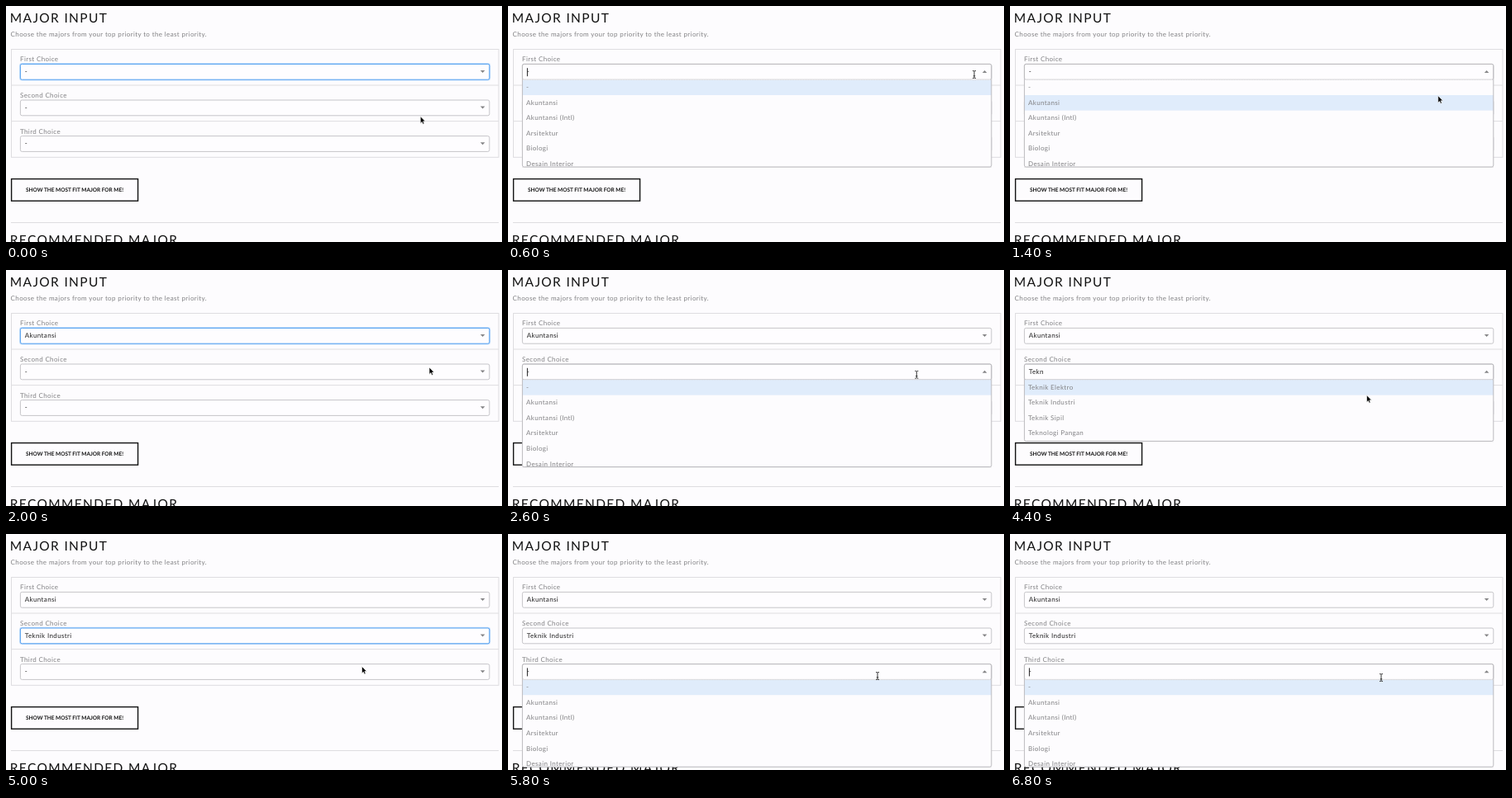
Animation, 600 px wide and 286 px high, one loop 7000 ms. Source, as an HTML page:

```html
<!DOCTYPE html>
<html lang="en">
<head>
<meta charset="utf-8">
<title>Major input</title>
<style>
  html, body { margin: 0; width: 100%; height: 100%; overflow: hidden; background: #fdfcfe; }
  svg { display: block; width: 600px; height: 286px; }
  text {
    font: 8px Lato, "Open Sans", sans-serif;
    letter-spacing: .37px;
    text-rendering: geometricPrecision;
    white-space: pre;
  }
  .title { font-size: 15.5px; letter-spacing: 1.35px; fill: #111; }
  .button { font-size: 6.5px; font-weight: 700; letter-spacing: 0; fill: #111; }
  .soft { fill: #828284; }
  .value { fill: #222; }
  .line { fill: none; stroke: #dedde0; }
</style>
</head>
<body>
<svg id="stage" viewBox="0 0 600 286"></svg>
<script>
const LOOP = 7000, OPTION_H = 18.6, MAX_H = 105.6;
const LABELS = ['First Choice', 'Second Choice', 'Third Choice'];
const MAJORS = ['-', 'Akuntansi', 'Akuntansi (Intl)', 'Arsitektur', 'Biologi', 'Desain Interior',
  'Teknik Elektro', 'Teknik Industri', 'Teknik Sipil', 'Teknologi Pangan'];
const START = { ring: -1, open: -1, picks: ['-', '-', '-'], typed: '', hover: 0, caret: 0, pointer: 'arrow' };
const opened = row => ({ ring: -1, open: row, typed: '', hover: 0, caret: 1, pointer: 'beam' });
const closed = (row, ...picks) => ({ ring: row, open: -1, picks, caret: 0, pointer: 'arrow' });

// Each entry changes part of the state and keeps the rest.
const STEPS = [
  [0, { ring: 0, at: [501.3, 133.8] }],
  [200, { at: [535, 108] }],
  [400, { at: [563, 82] }],
  [600, { ...opened(0), at: [564, 83] }],
  [1000, { caret: 0, at: [561, 84] }],
  [1200, { pointer: 'arrow', at: [540, 97] }],
  [1400, { hover: 1, at: [517.8, 108.8] }],
  [1600, { at: [516, 114] }],
  [1800, { ...closed(0, 'Akuntansi', '-', '-'), at: [515, 116] }],
  [2000, { at: [512, 118] }],
  [2200, { at: [505, 122] }],
  [2400, { at: [496, 126] }],
  [2600, { ...opened(1), at: [494.3, 126.8] }],
  [3000, { caret: 0 }],
  [3200, { typed: 'T', caret: 1, pointer: 'none' }],
  [3400, { typed: 'Te' }],
  [3600, { typed: 'Tek' }],
  [3800, { typed: 'Tekn' }],
  [4000, { pointer: 'beam' }],
  [4200, { caret: 0, pointer: 'arrow', at: [455, 140] }],
  [4400, { at: [431.5, 151.8] }],
  [4600, { hover: 1, at: [430, 157] }],
  [4800, { at: [430, 160] }],
  [5000, { ...closed(1, 'Akuntansi', 'Teknik Industri', '-'), at: [430.5, 160.5] }],
  [5400, { at: [438, 165] }],
  [5600, { at: [447, 171] }],
  [5800, { ...opened(2), at: [447, 172] }],
  [6200, { caret: 0 }],
  [6800, { caret: 1, at: [449, 174] }]
];
let last = START;
const states = STEPS.map(([time, change]) => [time, last = { ...last, ...change }]);

const text = (x, y, str, cls) => `<text x="${x}" y="${y}" class="${cls}">${str}</text>`;
const rect = (x, y, w, h, attrs) => `<rect x="${x}" y="${y}" width="${w}" height="${h}" ${attrs}/>`;
const path = (d, attrs) => `<path d="${d}" ${attrs}/>`;
const rowTop = row => 70.4 + 43.6 * row;

function field(s, row) {
  const y = rowTop(row), open = s.open === row;
  const box = attrs => rect(17.4, y, 567.4, 18.8, 'rx="2" ' + attrs);
  const value = open && s.typed || s.picks[row];
  return text(17, y - 3, LABELS[row], 'soft') +
    (s.ring === row ? box('fill="none" stroke="#5aa6f5" stroke-opacity=".35" stroke-width="2.6"') : '') +
    box(`fill="#fefdff" stroke="${s.ring === row ? '#529fef' : '#c6c5c9'}"`) +
    text(22.8, y + 11.8, value, 'value') +
    path(`M573.8 ${y + (open ? 10.7 : 7.6)}h5.6l-2.8 ${open ? -3 : 3}z`, 'fill="#858587"');
}

function dropdown(s) {
  const y = rowTop(s.open), top = y + 19;
  const items = MAJORS.filter(m => m.toLowerCase().includes(s.typed.toLowerCase()));
  const h = Math.min(MAX_H, items.length * OPTION_H);
  const options = items.map((name, i) => {
    const oy = top + i * OPTION_H;
    return (i === s.hover ? rect(17, oy, 568, OPTION_H, 'fill="#e0ecfb"') : '') +
      text(22, oy + 11.6, name, 'soft');
  }).join('');
  const caretX = 23.4 + 4.25 * s.typed.length;
  return `<clipPath id="list">${rect(17, top, 568, h, '')}</clipPath>` +
    rect(17, top + 1, 568, h, 'fill="#000" opacity=".08"') +
    rect(17, top, 568, h, 'fill="#fdfcfe"') +
    `<g clip-path="url(#list)">${options}</g>` +
    path(`M17 ${top}h568`, 'stroke="#d8d8da" stroke-dasharray="1 1"') +
    rect(17.4, y, 567.4, 19 + h, 'rx="2" fill="none" stroke="#bcbbbf"') +
    (s.caret ? path(`M${caretX} ${y + 4.8}v10`, 'stroke="#222"') : '');
}

function pointer({ pointer: kind, at }) {
  const shapes = {
    none: '',
    arrow: path('M0 0V8.4L1.9 6.6 3.1 9.4 4.6 8.7 3.4 6H5.9Z', 'fill="#000" stroke="#fff" stroke-width=".6"'),
    beam: path('M-2-4.4H-.8L0-3.8 .8-4.4H2M0-3.8V3.8M-2 4.4H-.8L0 3.8 .8 4.4H2M-1.2 1.8H1.2',
      'fill="none" stroke="#222" stroke-width=".9"')
  };
  return `<g transform="translate(${at})">${shapes[kind]}</g>`;
}

function render(s) {
  return text(4.8, 20, 'MAJOR INPUT', 'title') +
    text(5.6, 36.6, 'Choose the majors from your top priority to the least priority.', 'soft') +
    rect(6.5, 52.5, 589.5, 130.8, 'class="line"') +
    path('M6 96H596M6 139.6H596M6 262.5H596', 'class="line"') +
    LABELS.map((_, row) => field(s, row)).join('') +
    rect(6.6, 209.6, 153, 26.6, 'fill="none" stroke="#111" stroke-width="1.4"') +
    text(24, 225, 'SHOW THE MOST FIT MAJOR FOR ME!', 'button') +
    text(4.8, 288.6, 'RECOMMENDED MAJOR', 'title') +
    (s.open >= 0 ? dropdown(s) : '') +
    pointer(s);
}

const stage = document.getElementById('stage');
const start = performance.now();
let shown;
function tick() {
  const t = (performance.now() - start) % LOOP;
  const state = states.findLast(([time]) => time <= t)[1];
  if (state !== shown) stage.innerHTML = render(shown = state);
  requestAnimationFrame(tick);
}
tick();
</script>
</body>
</html>
```
